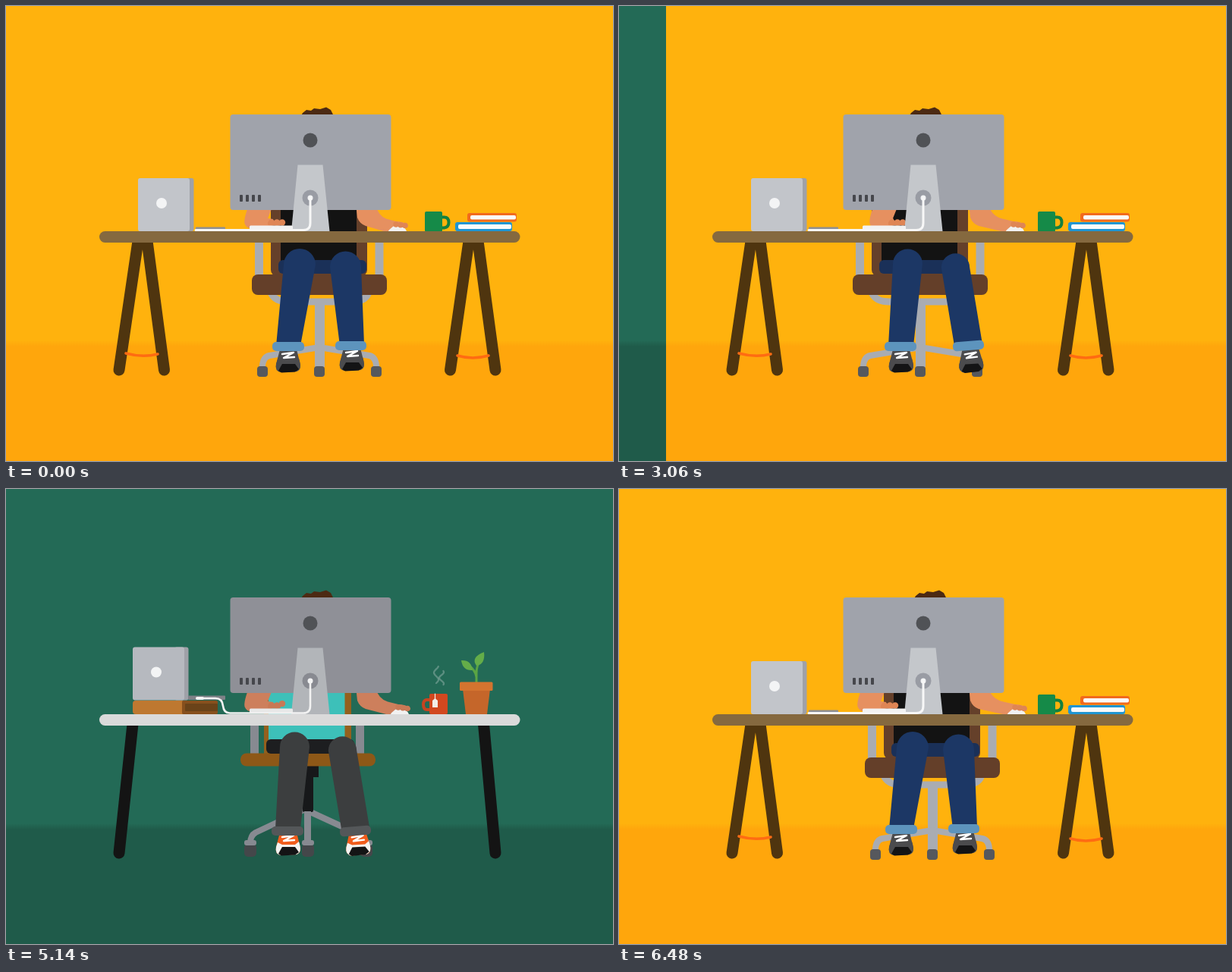
Animation of 800 by 600 pixels, one loop 6.54 s. Source, as an HTML page with a canvas:

```html
<!DOCTYPE html>
<html lang="en">
<head>
<meta charset="utf-8">
<title>Two desks</title>
<style>
html, body { margin: 0; width: 100%; height: 100%; overflow: hidden; background: #ffb20d; }
canvas { display: block; width: 800px; height: 600px; }
</style>
</head>
<body>
<canvas id="stage" width="800" height="600"></canvas>
<script>
const ctx = document.getElementById('stage').getContext('2d');
const LOOP = 6540;
const lerp = (a, b, k) => a + (b - a) * k;
const clamp = v => Math.max(0, Math.min(1, v));

// Smooth monotone curve through [time, value] keys.
function track(keys) {
  const n = keys.length;
  const d = keys.slice(1).map((k, i) => (k[1] - keys[i][1]) / (k[0] - keys[i][0]));
  const m = keys.map((k, i) => {
    const a = d[i - 1], b = d[i];
    return i > 0 && i < n - 1 && a * b > 0 ? 2 * a * b / (a + b) : 0;
  });
  return t => {
    if (t <= keys[0][0]) return keys[0][1];
    if (t >= keys[n - 1][0]) return keys[n - 1][1];
    let i = 0;
    while (t > keys[i + 1][0]) i++;
    const [t0, a] = keys[i], [t1, b] = keys[i + 1];
    const w = t1 - t0, u = (t - t0) / w, v = 1 - u;
    return a * v * v * (1 + 2 * u) + b * u * u * (3 - 2 * u)
      + w * u * v * (m[i] * v - m[i + 1] * u);
  };
}

const wipe = track([[0, 0], [90, 61], [350, 666], [470, 770], [520, 800]]);
const mouseX = track([[280, 0], [420, 18], [680, 18], [960, 2], [1320, -8], [2650, -8], [2900, 6]]);
const chairRoll = track([[2040, 0], [2340, 1.2], [2620, 1]]);
const headX = track([[1500, 0], [2300, -6]]);
const headBack = track([[3560, -6], [3940, 0]]);
const elbowX = track([[1390, 0], [1680, -23], [1980, -8], [2420, 16]]);
const elbowBack = track([[4020, 17], [4400, 0]]);
const reach = track([[1390, 0], [1620, 1], [2480, 1], [2660, 0]]);
const lift = track([[1640, 0], [1960, 1], [2180, 1], [2460, 0]]);
const steamHead = track([[4020, 0], [4950, 1]]);
const steamTail = track([[5150, 0], [6080, 1]]);

function poly(color, ...pts) {
  ctx.fillStyle = color;
  ctx.beginPath();
  for (let i = 0; i < pts.length; i += 2) ctx.lineTo(pts[i], pts[i + 1]);
  ctx.closePath();
  ctx.fill();
}
function box(color, x0, y0, x1, y1, r = 0) {
  ctx.fillStyle = color;
  ctx.beginPath();
  ctx.roundRect(x0, y0, x1 - x0, y1 - y0, r);
  ctx.fill();
}
function dot(color, x, y, r) {
  ctx.fillStyle = color;
  ctx.beginPath();
  ctx.arc(x, y, r, 0, 7);
  ctx.fill();
}
function stroke(color, width, path) {
  ctx.strokeStyle = color;
  ctx.lineWidth = width;
  ctx.lineCap = 'round';
  ctx.lineJoin = 'round';
  ctx.stroke(new Path2D(path));
}
function fillPath(color, path) {
  ctx.fillStyle = color;
  ctx.fill(new Path2D(path));
}
function at(x, y, angle, draw) {
  ctx.save();
  ctx.translate(x, y);
  ctx.rotate(angle);
  draw();
  ctx.restore();
}

function room(wall, floor) {
  box(wall, 0, 0, 800, 600);
  const g = ctx.createLinearGradient(0, 441, 0, 449);
  g.addColorStop(0, wall);
  g.addColorStop(1, floor);
  box(g, 0, 441, 800, 600);
}

function monitor(c) {
  box(c.screen, 295.5, 143, 507.5, 269, 4);
  dot('#505256', 401, 177, 9.5);
  for (let i = 0; i < 4; i++) box('#46474c', 308 + i * 8, 249, 312 + i * 8, 258, 1);
  poly(c.stand, 384.5, 209.5, 417.5, 209.5, 426.5, 297, 376, 297);
  dot(c.hub, 401, 253, 10.5);
  dot('#f1f2f3', 401, 253, 3.5);
}

function laptop(x, y, face) {
  box('#9fa1a8', x + 55, y, x + 73.5, y + 70, 3);
  box(face, x, y, x + 68, y + 70, 3);
  dot('#f3f4f5', x + 31, y + 33, 7);
}

function leg(color, kx, ky, r, ax, bx, ay, by) {
  ctx.fillStyle = color;
  ctx.beginPath();
  ctx.arc(kx, ky, r, Math.PI, 0);
  ctx.lineTo(bx, by);
  ctx.lineTo(ax, ay);
  ctx.fill();
}

function shoe(x, y, angle, c) {
  at(x, y, angle, () => {
    fillPath(c.shoe, 'M-11 -2H11L15 14Q18 25 11 27L-9 28Q-18 27 -16 17Z');
    fillPath(c.side, 'M-14 11L-8 14H9L14 10Q19 24 11 27L-9 28Q-18 27 -16 17Z');
    poly('#141415', -13, 26, -8, 17, 9, 17, 14, 24, 9, 27.5, -9, 28.5);
    stroke('#fff', 2.4, 'M-8 4L7 2L-6 9L8 8');
  });
}

function legs(s, c, tap) {
  const shift = -16 * s;
  box(c.hips, 359 + shift, c.hipTop, 475 + shift, 353 - 4 * c.low, 6);
  shoe(372, 455, tap, c);
  shoe(lerp(456, 463.5, s), lerp(453, 455, s), -.05 * s, c);
  leg(c.pants, lerp(387, 380.5, s), lerp(341, 340, s), lerp(21, 19.5, s),
    lerp(356, 355, s), 388, 448, 448);
  leg(c.pants, lerp(447.5, 443.5, s), lerp(344, 345, s), lerp(20.5, 18.7, s),
    lerp(440, 442, s), lerp(472, 479, s), 448, 446);
  at(lerp(372, 371, s), 449 + 2 * c.low, 0, () => box(c.cuff, -21, -6, 21, 6, 5));
  at(lerp(454.5, 460.5, s), 448 + 3 * c.low, -.08 * s, () => box(c.cuff, -20.5, -6, 20.5, 6, 5));
}

function hair(dx) {
  at(dx, 0, 0, () => poly('#4c2a13', 388, 146, 391, 141, 396, 137, 402, 138, 406, 135,
    414, 136, 422, 133.5, 428, 137, 431, 143, 431, 146));
}

function leftArm(e, c, t, typing) {
  const h = e * .62;
  fillPath(c.skin, `M${321 + e} 260Q${313 + e} 280 ${314.5 + e} 287Q${317 + e} 294 ${326 + e} 294
    L${350 + h} 290L${352 + h} 281L${345 + e} 280L${353 + e} 260Z`);
  for (let i = 0; i < 3; i++) {
    const up = typing * 3 * Math.max(0, Math.sin(t / 42 + i * 2.1));
    dot(c.hand, 350 + h + i * 7, 285.5 - up, 4.2);
  }
  box(c.hand, 345 + h, 284, 362 + h, 289.5, 2);
}

function forearm(color, ex, ey, hx, hy) {
  const a = Math.atan2(hy - ey, hx - ex), nx = -Math.sin(a), ny = Math.cos(a);
  dot(color, ex, ey, 13);
  dot(color, hx, hy, 7);
  poly(color, ex + nx * 13, ey + ny * 13, hx + nx * 7, hy + ny * 7,
    hx - nx * 7, hy - ny * 7, ex - nx * 13, ey - ny * 13);
}

function mouse(x) {
  fillPath('#f1f1f1', `M${504 + x} 297Q${505 + x} 289 ${514 + x} 290Q${526 + x} 290 ${528 + x} 297Z`);
}

function mouseHand(x, c) {
  fillPath(c.skin, `M461 260L463 279Q466 287 474 290L${498 + x} 297H${504 + x}
    L${514 + x} 284L${501 + x * .7} 280.5Q491 277 487 262Z`);
  mouse(x);
  fillPath(c.skin, `M${499 + x} 283L${513 + x} 284Q${524 + x} 284 ${530 + x} 289
    Q${530 + x} 293 ${525 + x} 292L${511 + x} 290L${504 + x} 296L${497 + x} 296Z`);
  for (let i = 0; i < 3; i++) dot(c.hand, 514 + x + i * 6, 288 + i * .7, 3.7);
}

const warm = {
  screen: '#a0a3ab', stand: '#c4c7cb', hub: '#999ca4',
  skin: '#e69060', hand: '#df8554', hips: '#1a3058', pants: '#1c3765', cuff: '#5d94bd',
  shoe: '#4b4b4d', side: '#4b4b4d', hipTop: 335, low: 0
};
const cool = {
  screen: '#8f9097', stand: '#b2b5b9', hub: '#888a91',
  skin: '#cd7f5c', hand: '#c87955', hips: '#1d1e20', pants: '#3c3e3f', cuff: '#545759',
  shoe: '#f15c1c', side: '#f4f3f0', hipTop: 330, low: 1
};

function warmChair(dx) {
  const grey = '#a9acb2';
  at(dx, 0, 0, () => {
    box('#65402a', 349, 250, 476, 356, 8);
    box(grey, 328, 305, 339, 360);
    box(grey, 486.5, 305, 497.5, 360);
    stroke(grey, 9, 'M350 380Q356 390 372 390H456Q472 390 477 380');
    box(grey, 407, 388, 420, 476);
    stroke(grey, 8, 'M413 450L347 461Q339 463 338 474M413 450L479 461Q487 463 488 474');
    for (const x of [338, 413, 488]) box('#56585d', x - 7, 475, x + 7, 489, 4);
    box('#643f29', 324, 354, 502, 381, 8);
    box('#131313', 362, 250, 462, 342);
  });
}

function coolChair() {
  const grey = '#878a91';
  box('#94601d', 340, 250, 455, 352, 3);
  box(grey, 322, 305, 333, 352);
  box(grey, 461, 305, 472, 352);
  stroke(grey, 8, 'M397 421L329 453Q322 457 322 467M397 424L460 453Q473 458 475 467');
  box('#17181a', 392, 364, 412, 380);
  box('#17181a', 391, 378, 405, 426, 2);
  box(grey, 393, 425, 402, 470);
  for (const x of [322, 398, 475]) {
    box('#44474a', x - 8, 468, x + 8, 485, 5);
    box(grey, x - 8, 463, x + 8, 470, 3);
  }
  box('#8e5817', 309, 348.5, 487, 365.5, 8);
  box('#3dc0b9', 346, 250, 446.5, 335);
}

function greenMug(x, y, angle) {
  at(x, y, angle, () => {
    stroke('#13803f', 4, 'M10 -6H14Q20 -6 20 1Q20 7 14 8H10');
    box('#158a48', -11.5, -13.5, 11.5, 13.5, 2);
  });
}

function book(color, x, y, w, h) {
  box(color, x, y, x + w, y + h, 3);
  box('#fafafa', x + 4, y + 3, x + w - 1, y + h - 3, 2);
}

function drawWarm(t) {
  const late = t > 5000, k = late ? 0 : t;
  const s = chairRoll(k), e = elbowX(k), mx = late ? 8 : mouseX(k);
  const r = reach(k), l = lift(k);
  const typing = k > 680 && k < 1320 || k > 2700 && k < 2960 ? 1 : 0;
  const mugX = lerp(563.5, 425, l), mugY = lerp(284.5, 190, l) - 35 * Math.sin(Math.PI * l);

  room('#ffb20d', '#ffa60c');
  hair(headX(k));
  warmChair(-16 * s);
  legs(s, warm, 0);
  leftArm(e, warm, k, typing);
  if (r < .02) {
    mouseHand(mx, warm);
    greenMug(563.5, 284.5, 0);
  } else {
    mouse(mx);
    const hx = lerp(512 + mx, mugX + 15, r), hy = lerp(288, mugY + 1, r);
    forearm(warm.skin, lerp(474, 488, r) + 22 * Math.sin(Math.PI * l), 268, hx, hy);
    greenMug(mugX, mugY, -.3 * l);
    box(warm.hand, hx - 7, hy - 6, hx + 9, hy + 6, 5);
  }

  const wood = '#4f350f';
  stroke(wood, 15, 'M174 310L149 480M186 310L208.5 480M610 310L585.5 480M622 310L645 480');
  stroke('#ff6b12', 3.5, 'M158 458Q180 464 200 459M595 461Q615 467 636 461');
  laptop(174, 227, '#c2c5ca');
  box('#8e8f94', 250, 291.5, 289, 295, 1);
  book('#f26a1c', 608, 273, 65, 11.5);
  book('#2095d2', 592, 285, 75, 12);
  monitor(warm);
  box('#f2f2f2', 321, 289.5, 378, 295.5, 1.5);
  stroke('#f7f7f7', 3, 'M250 295.5H392Q401 295.5 401 286V253');
  box('#85693f', 123, 297, 677.5, 312, 7.5);
}

function steam(t) {
  const a = steamTail(t), b = steamHead(t);
  if (b <= a) return;
  const wisp = (x, y, h, phase) => {
    let path = '';
    for (let i = 0; i <= 30; i++) {
      const u = lerp(a, b, i / 30);
      path += `${i ? 'L' : 'M'}${x + 3 * Math.sin(u * 7.5 + phase)} ${y - h * u}`;
    }
    stroke('rgba(150,180,172,.5)', 2.3, path);
  };
  wisp(567, 256, 22, 0);
  wisp(574, 258, 18, 1);
}

function plant() {
  stroke('#5aa444', 3, 'M620 256V243Q620 233 625 226M620 248Q619 239 609 232');
  fillPath('#64ad49', 'M600 226Q613 225 615 239Q602 240 600 226Z');
  fillPath('#64ad49', 'M630 215Q632 231 620 233Q612 222 630 215Z');
  poly('#c5662a', 602, 264, 638, 264, 634, 297, 606, 297);
  box('#d4742f', 598, 254.5, 641.5, 266, 1.5);
}

function drawCool(t) {
  const typing = t > 4420 && t < 5960 ? 1 : 0;
  const beat = clamp((t - 4000) / 100) * clamp((5960 - t) / 100);
  const e = elbowBack(t);

  room('#236a56', '#1f5b4a');
  hair(headBack(t));
  coolChair();
  legs(1, cool, .05 * beat * Math.sin((t - 5140) / 100));
  leftArm(e, cool, t, typing);
  mouseHand(3, cool);

  stroke('#141414', 15, 'M167 310L149 480M629.5 310L645 480');
  box('#be7830', 167, 279, 236, 297, 4);
  box('#87501d', 232, 279, 279, 297, 2);
  box('#6a4319', 236, 283, 279, 293, 1);
  laptop(167, 208.5, '#b6b9bf');
  box('#7f8187', 240, 272.5, 289, 278, 1);
  plant();
  steam(t);
  stroke('#c74420', 4, 'M560 278H554Q550 279 550 284Q550 291 555 291H560');
  box('#d2481f', 558, 270, 582, 297, 2);
  stroke('#f2eee8', 1.2, 'M565.5 270V278');
  poly('#f2eee8', 562, 279, 565.5, 276, 569, 279, 569, 288, 562, 288);
  monitor(cool);
  box('#e8e8e8', 321, 289.5, 378, 295.5, 1.5);
  stroke('#f2f2f2', 4, 'M252 276H259');
  stroke('#f2f2f2', 2.6, 'M256 276H276Q285 276 286 286Q287 295.5 295 295.5H392Q401 295.5 401 286V253');
  box('#dadada', 123, 297, 677.5, 312, 7.5);
}

function reveal(x, draw, t) {
  if (x <= 0) return;
  ctx.save();
  ctx.beginPath();
  ctx.rect(0, 0, x, 600);
  ctx.clip();
  draw(t);
  ctx.restore();
}

const start = performance.now();
function frame() {
  const t = (performance.now() - start) % LOOP;
  if (t < 5000) {
    drawWarm(t);
    reveal(wipe(t - 2970), drawCool, t);
  } else {
    drawCool(t);
    reveal(wipe(t - 5945), drawWarm, t);
  }
  requestAnimationFrame(frame);
}
frame();
</script>
</body>
</html>
```
